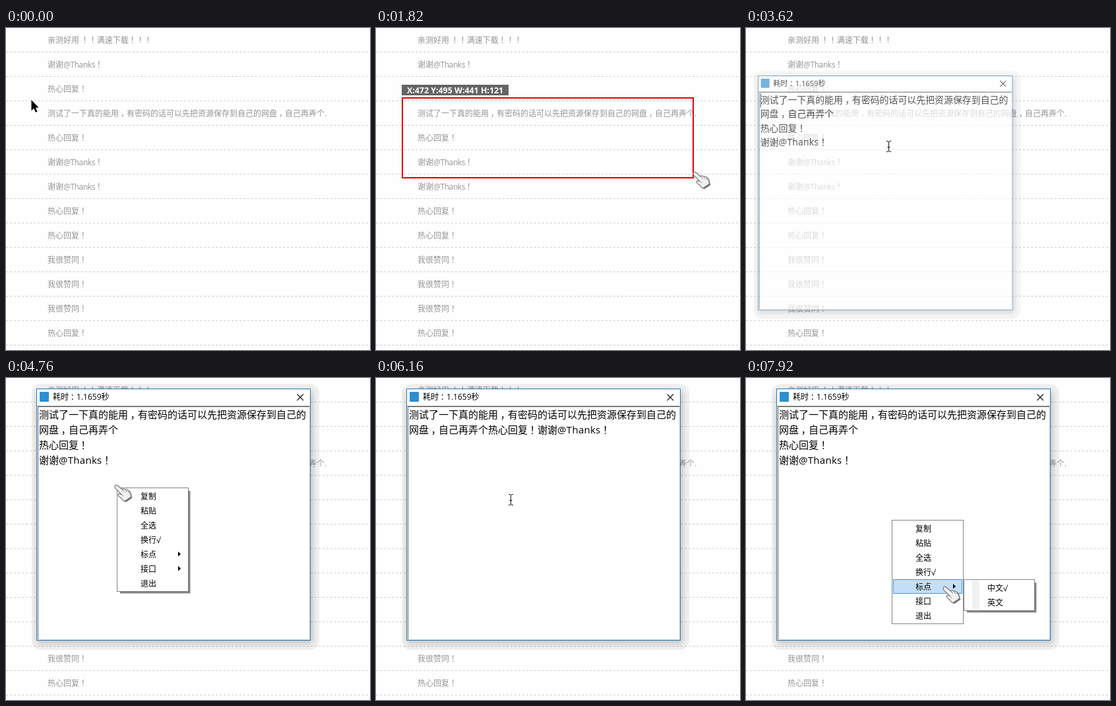
Write an HTML page that moves like this. It is 552 by 488 pixels and loops after 8000 ms.

```html
<!DOCTYPE html>
<html lang="zh-CN">
<head>
<meta charset="utf-8">
<style>
  html, body { margin: 0; width: 100%; height: 100%; overflow: hidden; background: #fefefe; }
  svg { display: block; width: 552px; height: 488px; }
  text { font-family: "Noto Sans CJK SC", "Noto Sans CJK", sans-serif; text-spacing-trim: space-all; white-space: pre; }
  .en { font-family: "Open Sans", "Noto Sans", sans-serif; }
  #tag text { font: bold 12.4px "Open Sans", sans-serif; fill: #fff; }
</style>
</head>
<body>
<svg viewBox="0 0 552 488" xmlns="http://www.w3.org/2000/svg">
  <defs>
    <filter id="soft" x="-10%" y="-10%" width="120%" height="120%"><feGaussianBlur stdDeviation="4"/></filter>
    <path id="palm" d="M1 2C1 0 4 0 5.5 1.2L12.5 7C14 5.4 16 5.8 17 7.2C19 6.2 21 7.2 21.6 9.2C23.6 9.2 24.6 11 24.6 13L25.6 18.4L16.4 24.6C14 24.6 12.6 23 11.6 20.8L7.2 17.4C5 15.6 6.4 13 9 13.8L11 14.4L2 5.4C1.2 4.4 1 3 1 2Z"/>
  </defs>
  <g id="page"></g>
  <g id="tag">
    <rect x="39" y="86" height="16" fill="#646464"/>
    <text x="47" y="98.5"></text>
  </g>
  <rect id="sel" x="40" y="106" fill="none" stroke="#e60000" stroke-width="2"/>
  <g id="win">
    <rect x="39" y="9" width="436" height="403" rx="14" opacity=".06"/>
    <rect x="47" y="20" width="418" height="382" rx="4" opacity=".18" filter="url(#soft)"/>
    <rect x="46.5" y="16.5" width="415" height="381" fill="#fff" stroke="#2b78b4"/>
    <rect x="51" y="21" width="14" height="15" rx="1" fill="#2d8fd0"/>
    <path d="M441.5 24.5l9.5 9.5m0-9.5l-9.5 9.5" stroke="#111" stroke-width="1.1"/>
    <path d="M48 396.5H460.5V44" fill="none" stroke="#dcdcdc"/>
    <path d="M47 42.5H461" stroke="#999"/>
    <path d="M48.5 396V43.5H460" fill="none" stroke="#606060"/>
    <g id="title"></g>
    <g id="wrapped"></g>
    <g id="joined"></g>
    <path id="caret" d="M50.5 45V68" stroke="#000"/>
  </g>
  <g id="menus"></g>
  <g id="arrow">
    <path d="M.5 0V16.2L4.2 12.8L7 18.8L9.6 17.7L6.9 11.8H11.6Z" stroke="#fff" stroke-width="1.2" paint-order="stroke"/>
  </g>
  <g id="beam">
    <path d="M-2.5-7.5H-1L.5-6.5L2-7.5H3.5M.5-6V7M-2.5 8.5H-1L.5 7.5L2 8.5H3.5M-1 1.5H2" fill="none" stroke="#111" stroke-linecap="square"/>
  </g>
  <g id="hand">
    <g transform="translate(-4 -4)" stroke-linejoin="round">
      <use href="#palm" x="2" y="1.8" opacity=".32"/>
      <use href="#palm" fill="#f1f1f1" stroke="#777" stroke-width="1.2"/>
      <path d="M12.5 7L16 11M17 7.2L19.8 11M21.6 9.2L22.8 12.6M11 14.4L14 17" fill="none" stroke="#858585"/>
      <path d="M16.8 25L26.2 18.6" stroke="#6c6c6c" stroke-width="2"/>
    </g>
  </g>
</svg>
<script>
const LOOP = 8000, BLINK = 530;
const $ = id => document.getElementById(id);
const show = (el, on) => el.style.display = on ? '' : 'none';
const ease = p => p * p * (3 - 2 * p);

// Latin runs get their own face; full-width marks sit in the middle of their cell.
function label(str, x, y, size = 12, fill = '#000') {
  const gap = size === 12 ? -.4 : .27, shift = size * .23;
  const latin = s => s.replace(/[!-~√]+/g, m =>
    `<tspan class="en" letter-spacing="${m.includes('@') ? gap : 0}">${m}</tspan>`);
  const parts = str.split(/([，！：]+)/).map((s, i) => {
    const dx = i % 2 ? shift : i ? -shift : 0;
    return s && `<tspan dx="${dx}">${latin(s)}</tspan>`;
  });
  return `<text x="${x}" y="${y}" font-size="${size}" fill="${fill}">${parts.join('')}</text>`;
}

// Page and window text
const THANKS = '谢谢@Thanks！', REPLY = '热心回复！', AGREE = '我很赞同！';
const HEAD = '测试了一下真的能用，有密码的话可以先把资源保存到自己的';
const TAIL = '网盘，自己再弄个';
const rows = ['亲测好用 ！！满速下载！！！', THANKS, REPLY, HEAD + TAIL + '.', REPLY,
  THANKS, THANKS, REPLY, REPLY, AGREE, AGREE, AGREE, REPLY];
$('page').innerHTML = rows.map((s, i) =>
  label(s, 63, 23 + 37 * i, 12, '#959595') +
  `<path d="M0 ${36.5 + 37 * i}H549" stroke="#ccc" stroke-dasharray="3"/>`).join('');

const lines = list => list.map((s, i) => label(s, 50, 61 + 23 * i, 15)).join('');
$('title').innerHTML = label('耗时：1.1659秒', 71, 33);
$('wrapped').innerHTML = lines([HEAD, TAIL, REPLY, THANKS]);
$('joined').innerHTML = lines([HEAD, TAIL + REPLY + THANKS]);

// Each scene sets the cursor, sends it somewhere and may open a menu where it stands.
const scenes = [
  { at: 0, cursor: 'arrow', to: [38, 109] },
  { at: 80, cursor: 'arrow', to: [39, 106] },
  { at: 500, cursor: 'hand' },
  { at: 1140, cursor: 'hand', to: [484, 222], drag: true, bow: 60 },
  { at: 2000, cursor: 'hand', to: [490, 221], drag: true },
  { at: 2540, cursor: 'arrow', to: [216, 179] },
  { at: 3540, cursor: 'beam' },
  { at: 3880, cursor: 'beam', to: [168, 166] },
  { at: 4760, cursor: 'hand', to: [241, 236], wrap: '换行√', shadow: true },
  { at: 5560, cursor: 'beam', to: [204, 184], joined: true },
  { at: 6340, cursor: 'hand', to: [250, 253], wrap: '换行', joined: true },
  { at: 6780, cursor: 'beam', to: [221, 215] },
  { at: 7320, cursor: 'hand', to: [302, 320], wrap: '换行√' }
];
scenes.forEach((s, i) => {
  s.from = i ? scenes[i - 1].to : s.to;
  s.to = s.to || s.from;
  s.time = 260 + .9 * Math.hypot(s.to[0] - s.from[0], s.to[1] - s.from[1]);
});

function pointer(s, t) {
  const p = ease(Math.min(1, (t - s.at) / s.time));
  const [x, y] = s.from.map((a, i) => a + (s.to[i] - a) * p);
  return [x, y + (s.bow || 0) * Math.sin(Math.PI * p)].map(Math.round);
}

// Popup menus
function popup(x, y, w, list, { shadow, sub }) {
  const h = list.length * 22 + 4;
  const shade = d => `<path d="M5 ${h}H${w}V5h${d}V${h + d}H5Z" opacity=".24"/>`;
  const mark = i => `<path d="M93 ${9 + 22 * i}v7.6l4-3.8z"/>`;
  const g = document.createElementNS('http://www.w3.org/2000/svg', 'g');
  g.setAttribute('transform', `translate(${x} ${y})`);
  g.innerHTML =
    (shadow ? [1, 2, 3].map(shade).join('') : '') +
    `<rect x=".5" y=".5" width="${w - 1}" height="${h - 1}" fill="#fff" stroke="#858585"/>` +
    (sub ? `<rect x="13" y="2" width="11" height="${h - 4}" fill="#f1f1f1"/>` : '') +
    '<rect class="hot" x="2.5" width="104" height="21" fill="#c3dffa" stroke="#3a98ec"/>' +
    list.map((s, i) => label(s, 36, 17.5 + 22 * i) + (/标点|接口/.test(s) ? mark(i) : '')).join('');
  $('menus').append(g);
  return { g, hot: g.querySelector('.hot'), x, y, w, n: list.length };
}
for (const s of scenes.filter(s => s.wrap)) {
  const items = ['复制', '粘贴', '全选', s.wrap, '标点', '接口', '退出'];
  s.menu = popup(...s.from, 109, items, s);
}
const last = scenes[scenes.length - 1].menu;
const submenu = popup(last.x + last.w, last.y + 90, 108, ['中文√', '英文'], { shadow: true, sub: true });

function hover(m, x, y) {
  const row = Math.floor((y - m.y - 2) / 22);
  show(m.hot, x > m.x && x < m.x + m.w && row >= 0 && row < m.n);
  m.hot.setAttribute('y', 2.5 + 22 * row);
}

function drawSelection(on, x, y) {
  show($('sel'), on);
  show($('tag'), on);
  if (!on) return;
  const w = Math.max(1, x - 43), h = Math.max(1, y - 101);
  $('sel').setAttribute('width', w);
  $('sel').setAttribute('height', h);
  const [box, text] = $('tag').children;
  text.textContent = `X:472 Y:495 W:${w} H:${h}`;
  box.setAttribute('width', 120 + 7 * `${w}${h}`.length);
}

function drawWindow(s, t) {
  const opening = t < 3700;
  show($('win'), t >= 3540);
  $('win').setAttribute('transform', opening ? 'translate(18 72) scale(.929 .932) translate(-46 -16)' : '');
  $('win').setAttribute('opacity', t < 3620 ? .3 : opening ? .66 : 1);
  show($('joined'), s.joined);
  show($('wrapped'), !s.joined);
  show($('caret'), s.cursor === 'beam' && (t - s.at) % (2 * BLINK) < BLINK);
}

function render(t) {
  const s = scenes.filter(s => s.at <= t).pop();
  const [x, y] = pointer(s, t);
  for (const id of ['arrow', 'beam', 'hand']) show($(id), id === s.cursor);
  $(s.cursor).setAttribute('transform', `translate(${x} ${y})`);
  drawSelection(!!s.drag, x, y);
  drawWindow(s, t);
  for (const { menu } of scenes) if (menu) show(menu.g, menu === s.menu);
  show(submenu.g, t >= 7920);
  if (s.menu) hover(s.menu, x, y);
  hover(submenu, x, y);
}

const start = performance.now();
function tick() {
  render((performance.now() - start) % LOOP);
  requestAnimationFrame(tick);
}
tick();
</script>
</body>
</html>
```
